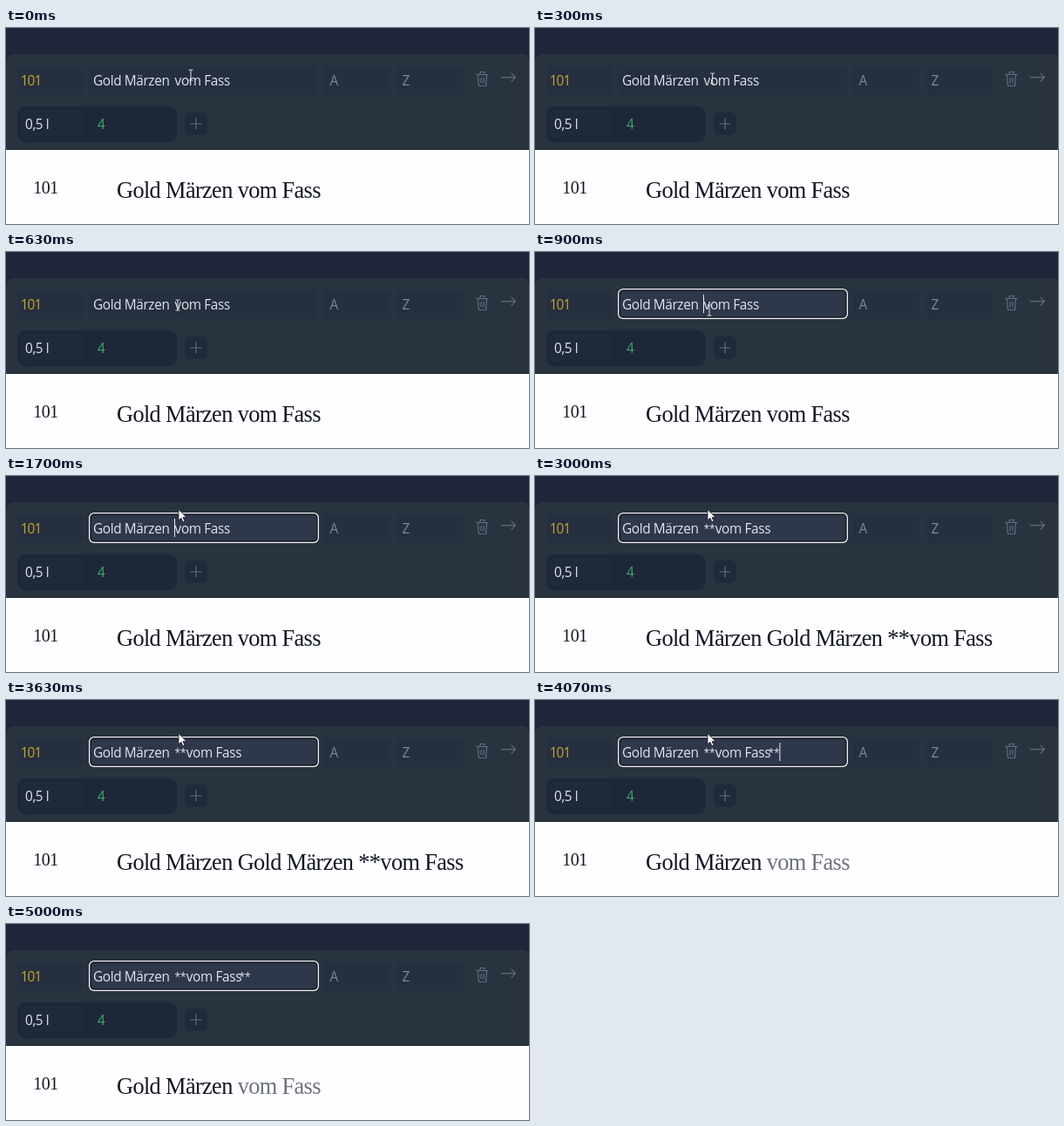
An HTML page that plays this animation: 600x225 px, repeating every 5.03 s.

```html
<!DOCTYPE html>
<html lang="de">
<head>
<meta charset="utf-8">
<style>
  html, body { margin: 0; width: 100%; height: 100%; overflow: hidden; background: #fefdff; }
  svg { display: block; width: 100%; height: 100%; }
  text { white-space: pre; }
  .ui { font: 15.4px "Open Sans", "Noto Sans", sans-serif; letter-spacing: -.4px; fill: #e2e5ea; }
  .star { font-size: 12px; letter-spacing: 0; }
  .hint { fill: #7d8796; }
  .code { fill: #c3a82b; letter-spacing: -1px; }
  .price { fill: #43a86c; }
  .print { font: 26.4px "Liberation Serif", "Noto Serif", serif; letter-spacing: -.025em; fill: #111827; }
  .small { font-size: 20px; }
  .soft { fill: #6b7280; }
  .icon { fill: none; stroke: #616c7c; stroke-width: 1.2; stroke-linecap: round; stroke-linejoin: round; }
</style>
</head>
<body>
<svg viewBox="0 0 600 225">
  <rect width="600" height="140" fill="#1f2639"/>
  <path d="M0 140V40Q0 30 10 30H592Q600 30 600 38V140Z" fill="#29323f"/>
  <rect y="140" width="600" height="85" fill="#fefdff"/>

  <g fill="#252f40">
    <rect x="13" y="44" width="75" height="32" rx="5"/>
    <rect x="95" y="44" width="263" height="32" rx="5"/>
    <rect x="365" y="44" width="76" height="32" rx="5"/>
    <rect x="449" y="44" width="75" height="32" rx="5"/>
  </g>
  <rect x="13" y="90" width="183" height="41" rx="9" fill="#1d2738"/>
  <rect x="16" y="95" width="73" height="31" rx="5" fill="#1f293a"/>
  <rect x="205" y="97" width="26" height="26" rx="7" fill="#1f293a"/>

  <g class="icon">
    <path d="M212 110H224M218 104V116"/>
    <path d="M539.5 53.5H553.5M541.5 53.5L542.5 66.5H550.5L551.5 53.5M544 53V50.5H549V53M545 57V63M548 57V63"/>
    <path d="M568.5 56.7H584.5M580 52.2L584.5 56.7L580 61.2"/>
  </g>

  <g id="focus">
    <rect x="95" y="42" width="264" height="35" rx="6" fill="#f5f5f6"/>
    <rect x="96.3" y="43.3" width="261.4" height="32.4" rx="4.8" fill="#141925"/>
    <rect x="97.8" y="44.8" width="258.4" height="29.4" rx="3.5" fill="#2f374b"/>
  </g>

  <g class="ui">
    <text x="16.8" y="66" class="code">101</text>
    <text x="100" y="66">Gold Märzen</text>
    <text id="open" class="star" x="193.5" y="65"></text>
    <text id="tail" y="66">vom Fass</text>
    <text id="close" class="star" x="267.5" y="65"></text>
    <text x="371.4" y="66" class="hint">A</text>
    <text x="454.4" y="66" class="hint">Z</text>
    <text x="22" y="116">0,5 l</text>
    <text x="105" y="116" class="price">4</text>
  </g>
  <rect id="caret" y="49" width="1" height="21" fill="#eceef2"/>

  <text class="print small" x="31.2" y="190">101</text>
  <text class="print" x="127" y="195"><tspan id="head"></tspan><tspan id="rest" class="soft"></tspan></text>

  <path id="beam" d="M-2.5 -6H-.6L0 -5.4L.6 -6H2.5M0 -5.4V5.4M-2.5 6H-.6L0 5.4L.6 6H2.5" fill="none" stroke="#d3d1cc" stroke-width="1.1"/>
  <path id="arrow" d="M0 0V12.4L2.9 9.7L4.9 14.2L7 13.3L5 8.9H9Z" fill="#fff" stroke="#151a26" stroke-width=".8"/>
</svg>
<script>
const LOOP = 5030;
const STAR = 6.6;
const el = id => document.getElementById(id);
const show = (id, on) => el(id).setAttribute('visibility', on ? 'visible' : 'hidden');
const put = (id, text) => { if (el(id).textContent !== text) el(id).textContent = text; };

// time, x, y of the pointer's hot spot
const path = [
  [0, 212, 54], [30, 212, 54], [530, 197, 61], [670, 197, 61],
  [900, 200, 67], [1070, 198, 38.5], [4870, 198, 38.5], [5000, 200, -20], [LOOP, 200, -20]
];
const caretOn = [[670, 1200], [1700, 2800], [3070, 3630], [3830, 4600]];

function pointer(t) {
  let i = 1;
  while (i < path.length - 1 && t > path[i][0]) i++;
  const [t0, x0, y0] = path[i - 1], [t1, x1, y1] = path[i];
  const k = (t - t0) / (t1 - t0), e = k * k * (3 - 2 * k);
  return [x0 + (x1 - x0) * e, y0 + (y1 - y0) * e];
}

function preview(opened, closed) {
  const name = 'Gold Märzen ';
  if (closed === 2) return [name, 'vom Fass'];
  const before = opened === 2 ? name + name : name;
  return [before + '*'.repeat(opened) + 'vom Fass' + '*'.repeat(closed), ''];
}

function render(t) {
  const count = (a, b) => (t >= a) + (t >= b);
  const opened = count(2070, 2270), closed = count(3830, 4070);

  show('focus', t >= 670);
  put('open', '*'.repeat(opened));
  put('close', '*'.repeat(closed));
  el('tail').setAttribute('x', 193.6 + STAR * opened);

  const caretX = t < 3070 ? 193 + STAR * opened : 268 + 6.2 * closed;
  el('caret').setAttribute('x', caretX);
  show('caret', caretOn.some(([a, b]) => t >= a && t < b));

  const [head, rest] = preview(opened, closed);
  put('head', head);
  put('rest', rest);

  const [x, y] = pointer(t);
  const inside = y > 43;
  for (const id of ['beam', 'arrow']) el(id).setAttribute('transform', `translate(${x} ${y})`);
  show('beam', inside);
  show('arrow', !inside);
}

const start = performance.now();
function tick() {
  render((performance.now() - start) % LOOP);
  requestAnimationFrame(tick);
}
tick();
</script>
</body>
</html>
```
